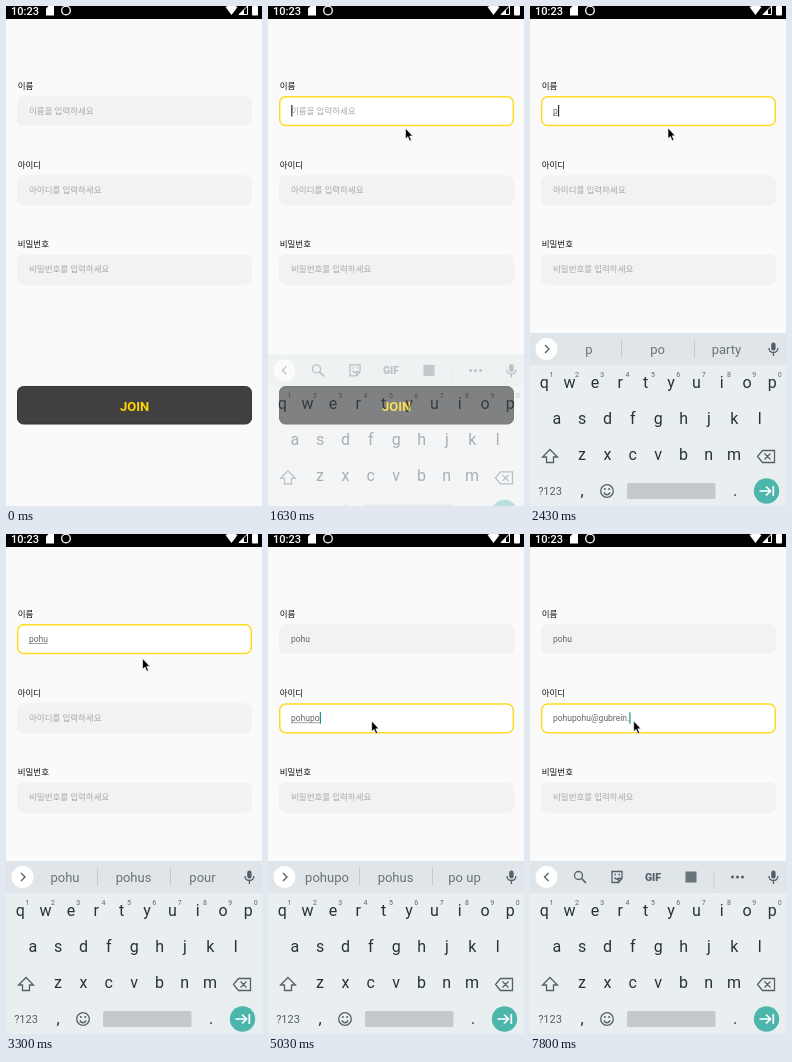
An HTML page that plays this animation: 256x500 px, repeating every 8000 ms.

```html
<!DOCTYPE html>
<html lang="ko">
<head>
<meta charset="utf-8">
<title>Join form</title>
<style>
  html, body { margin: 0; width: 100%; height: 100%; overflow: hidden; background: #fafafa; }
  svg { display: block; }
  text { font-family: Roboto, "Noto Sans CJK KR", "Noto Sans CJK JP", sans-serif; }
  .label { font-size: 8.5px; font-weight: 500; fill: #111; }
  .entry { font-size: 8.5px; }
  .mid { text-anchor: middle; }
  .key { font-size: 16px; fill: #263238; }
  .hint { font-size: 7px; fill: #5b656b; }
  .word { font-size: 13px; fill: #6a7378; }
  .line { fill: none; stroke: #566066; stroke-width: 1.3; }
</style>
</head>
<body>
<svg width="256" height="500" viewBox="0 0 256 500">
  <rect width="256" height="500" fill="#fafafa"/>
  <rect width="256" height="13" fill="#000"/>
  <g fill="#fff">
    <text x="5" y="9" font-size="11" font-weight="500">10:23</text>
    <path d="M42.5 0H48V9.5H40V2.5Z"/>
    <circle cx="60" cy="4.5" r="4.3" fill="none" stroke="#fff" stroke-width="1.3"/>
    <path d="M219.5 1Q225.5-2.5 231.5 1L225.5 9Z"/>
    <path d="M233 8.5L241.5 0V8.5Z" fill="none" stroke="#fff"/>
    <path d="M233 8.5L238 3.5V8.5Z"/>
    <rect x="246" y="0" width="6" height="9.5" rx="1"/>
  </g>

  <g id="form"></g>

  <rect x="11.5" y="380.5" width="234" height="37.5" rx="6" fill="#404040" stroke="#343434"/>
  <text class="mid" x="128.7" y="405" font-size="13" font-weight="700" fill="#ffd600">JOIN</text>

  <g id="keyboard">
    <rect y="327" width="256" height="210" fill="#e9eef1"/>
    <rect y="327" width="256" height="32" fill="#dfe5e8"/>
    <circle cx="16.5" cy="343" r="11" fill="#fff"/>
    <path id="chevron" class="line" stroke-width="1.6"/>
    <g id="tools">
      <g class="line">
        <circle cx="48.5" cy="341.5" r="4"/>
        <path d="M51.5 344.5L56 349" stroke-width="1.7"/>
        <path d="M82 337.5H92V344.5L88.5 348.5H82ZM92 344.5H88.5V348.5M84.5 343.5Q87 347 89.5 343.5M84.5 340.5H86M88.5 340.5H90"/>
      </g>
      <text class="mid" x="123" y="347" font-size="10.5" font-weight="900" fill="#566066">GIF</text>
      <rect x="155.5" y="337.5" width="11" height="11" fill="#68737a"/>
      <path d="M184 338V355" stroke="#cbd1d5"/>
      <g fill="#566066">
        <circle cx="202.5" cy="343" r="1.5"/><circle cx="207.5" cy="343" r="1.5"/><circle cx="212.5" cy="343" r="1.5"/>
      </g>
    </g>
    <g id="words">
      <path d="M91.5 334V352M164.5 334V352" stroke="#c3cacf"/>
      <text class="word mid" x="59" y="347.5"></text>
      <text class="word mid" x="127.5" y="347.5"></text>
      <text class="word mid" x="196.5" y="347.5"></text>
    </g>
    <rect x="241.2" y="336.5" width="4.4" height="8" rx="2.2" fill="#566066"/>
    <path class="line" d="M239 342Q239 346.5 243.4 346.5T247.8 342M243.4 346.5V350"/>
    <g id="keys"></g>
    <g class="line">
      <path d="M20 443.5L27.5 451H23.5V456.5H16.5V451H12.5Z"/>
      <path d="M232.5 444.5H244.5V456.5H232.5L227.5 450.5ZM234.5 447.5L240.5 453.5M240.5 447.5L234.5 453.5"/>
      <circle cx="77" cy="485" r="6.3"/>
      <path d="M73.8 486.5Q77 491 80.2 486.5"/>
    </g>
    <g fill="#566066"><circle cx="74.8" cy="483" r="1"/><circle cx="79.2" cy="483" r="1"/></g>
    <text class="mid" x="20" y="489" font-size="11" fill="#566066">?123</text>
    <text class="key mid" x="52" y="490">,</text>
    <text class="key mid" x="205" y="490">.</text>
    <rect x="97" y="477" width="88.5" height="16" rx="1.5" fill="#c3c9cc"/>
    <circle cx="236.5" cy="485" r="12.7" fill="#4db6ac"/>
    <path d="M229.5 485H240M236 480.5L240.5 485L236 489.5M243.3 480V490" fill="none" stroke="#fff" stroke-width="1.7"/>
  </g>

  <path id="pointer" d="M0 0V10.6L2.4 8.4L4.2 12.7L5.9 12L4.1 7.8H7.2Z" fill="#000" stroke="#fff" stroke-width=".6"/>
</svg>
<script>
const LOOP = 8000, FOCUS = [1370, 3895], PRESS = [1230, 3760];
const $ = id => document.getElementById(id);
const show = (el, on) => el.setAttribute('visibility', on ? 'inherit' : 'hidden');

// Form fields
const fields = [['이름', '이름을'], ['아이디', '아이디를'], ['비밀번호', '비밀번호를']].map(([label, object], i) => {
  const g = document.createElementNS('http://www.w3.org/2000/svg', 'g');
  g.setAttribute('transform', `translate(0 ${90 + i * 79.2})`);
  g.innerHTML = `<text class="label" x="11.7" y="-7.5">${label}</text>
    <rect x="11.7" y=".7" width="233.6" height="28.8" rx="6" stroke-width="1.5"/>
    <text class="entry" x="23" y="18"></text>
    <path/><rect y="9" width="1.2" height="11.5"/>`;
  $('form').append(g);
  const [, box, text, underline, caret] = g.children;
  return { box, text, underline, caret, hint: object + ' 입력하세요' };
});

// Letter keys
const keyRow = (letters, x, y) => [...letters].map((c, i) =>
  `<text class="key mid" x="${x + i * 25.35}" y="${y}">${c}</text>`).join('');
$('keys').innerHTML = keyRow('qwertyuiop', 14.2, 382) + keyRow('asdfghjkl', 26.8, 418) + keyRow('zxcvbnm', 52, 454) +
  [...'1234567890'].map((c, i) => `<text class="hint mid" x="${21.5 + i * 25.35}" y="370.5">${c}</text>`).join('');

// Typing: one time per added character
const typed = (string, times) => times.map((t, i) => [t, string.slice(0, i + 1)]);
const address = 'pohupohu@gubrein.';
const edits = [
  typed('pohu', [2300, 2470, 2570, 2640]),
  [...typed(address, [4400, 4500, 4570, 4670, 4830, 4930, 5100, 5170, 5900,
    6230, 6370, 6500, 6700, 6770, 6870, 7030, 7170]), [7430, address + 'v'], [7800, address]],
  []
];
const strips = [
  [2360, 'p|po|party'], [2530, 'po|pot|pop'], [2630, 'poh|oh|pop'], [2700, 'pohu|pohus|pour'], [4130, ''],
  [4460, 'p|pohu|party'], [4560, 'po|pohu|pop'], [4630, 'poh|pohu|pop'], [4730, 'pohu|pohus|pour'],
  [4890, 'pohup|pohu|pop'], [4990, 'pohupo|pohus|po up'], [5150, 'pohupoh|pohus|po oh'],
  [5230, 'pohupohu|pohupohus|pohu pohu'], [6030, '']
];
const path = [
  [230, 190, 141], [480, 172, 128], [700, 155, 115], [900, 166, 108.5], [1400, 166, 108.5],
  [1650, 137, 122.5], [1870, 138, 122], [3230, 138, 122], [3800, 105, 182.5], [3900, 104, 183], [4030, 103.7, 187]
];
const latest = (list, t) => list.filter(e => e[0] <= t).pop();

function drawField(f, i, t) {
  const focused = t >= FOCUS[i] && !(t >= FOCUS[i + 1]);
  const edit = latest(edits[i], t);
  const pressed = t >= PRESS[i] && t < FOCUS[i];
  f.box.setAttribute('fill', focused ? '#fff' : '#f2f2f2');
  f.box.setAttribute('stroke', focused ? '#fbdc22' : '#f2f2f2');
  f.text.textContent = edit ? edit[1] : f.hint;
  f.text.setAttribute('fill', edit ? '#666' : pressed ? '#858585' : '#a9a9a9');

  const end = 23 + (edit ? f.text.getComputedTextLength() : 0);
  const since = t - (edit ? edit[0] : FOCUS[i]);
  show(f.caret, focused && since % 1000 < 500);
  f.caret.setAttribute('x', end + .2);
  f.caret.setAttribute('fill', i && edit ? '#16998a' : '#333');
  show(f.underline, focused && edit && !edit[1].includes('@'));
  f.underline.setAttribute('d', `M23 19.5H${end}`);
  f.underline.setAttribute('stroke', '#777');
  f.underline.setAttribute('stroke-width', .7);
}

function drawKeyboard(t) {
  const rest = (1 - Math.min(1, Math.max(0, (t - 1600) / 150))) ** 2;
  $('keyboard').setAttribute('transform', `translate(0 ${34 * rest})`);
  $('keyboard').setAttribute('opacity', 1 - rest);
  const strip = (latest(strips, t) || [0, ''])[1];
  show($('tools'), !strip);
  show($('words'), strip);
  $('chevron').setAttribute('d', strip ? 'M15 339L19 343L15 347' : 'M18.5 339L14.5 343L18.5 347');
  const words = strip.split('|');
  $('words').querySelectorAll('text').forEach((el, i) => el.textContent = words[i] || '');
}

function drawPointer(t) {
  show($('pointer'), t >= path[0][0]);
  const next = path.findIndex(p => p[0] > t);
  let [, x, y] = path[next < 0 ? path.length - 1 : 0];
  if (next > 0) {
    const a = path[next - 1], b = path[next];
    const k = (t - a[0]) / (b[0] - a[0]), e = k * k * (3 - 2 * k);
    x = a[1] + (b[1] - a[1]) * e;
    y = a[2] + (b[2] - a[2]) * e;
  }
  $('pointer').setAttribute('transform', `translate(${x} ${y})`);
}

function frame() {
  const t = performance.now() % LOOP;
  fields.forEach((f, i) => drawField(f, i, t));
  drawKeyboard(t);
  drawPointer(t);
  requestAnimationFrame(frame);
}
frame();
</script>
</body>
</html>
```
